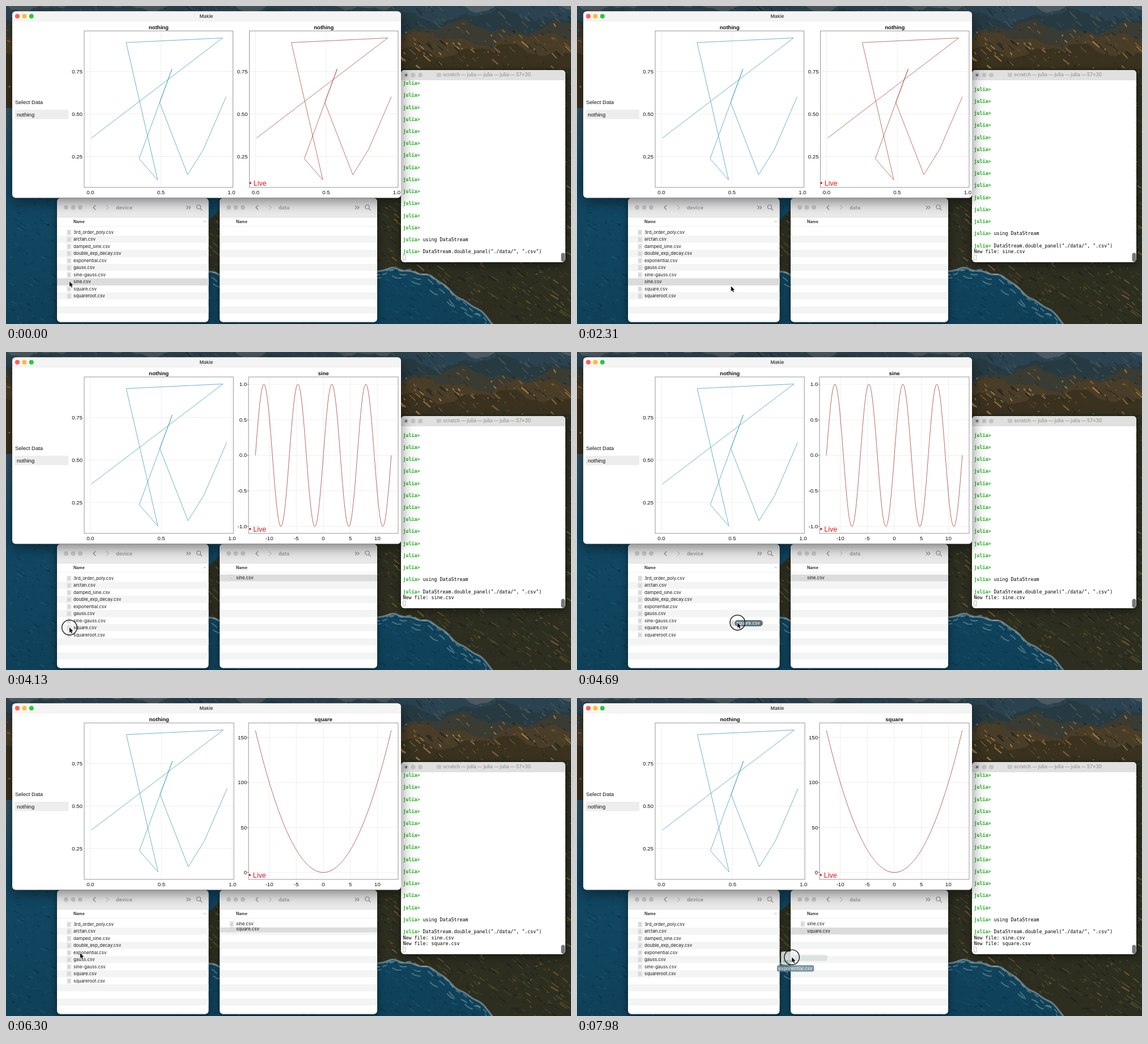
An HTML page with a canvas for the animation above (8 s loop, 997 by 561 pixels).

```html
<!DOCTYPE html>
<html lang="en">
<head>
<meta charset="utf-8">
<title>Live data panels</title>
<style>
html, body { margin: 0; width: 100%; height: 100%; overflow: hidden; background: #16323c; }
canvas { display: block; width: 997px; height: 561px; }
</style>
</head>
<body>
<canvas id="stage" width="997" height="561"></canvas>
<script>
const W = 997, H = 561, LOOP = 8000, STEP = 70, ROW = 12.47;
const HELV = '"Liberation Sans", Arial, sans-serif';
const UI = 'Inter, "Open Sans", sans-serif';
const MONO = '"DejaVu Sans Mono", monospace';
let ctx = document.getElementById('stage').getContext('2d');

const FILES = ['3rd_order_poly', 'arctan', 'damped_sine', 'double_exp_decay', 'exponential',
  'gauss', 'sine-gauss', 'sine', 'square', 'squareroot'].map(name => name + '.csv');

// Each file is dragged from its row to a drop point; everything else follows from these times.
const DRAGS = [
  { file: 'sine.csv', leave: 700, drop: 1820, x: 428, y: 490 },
  { file: 'square.csv', leave: 4200, drop: 5110, x: 430, y: 470 },
  { file: 'exponential.csv', leave: 7140, drop: 8140, x: 430, y: 459 }
];
// Delays after a drop
const LOGGED = 140, PLOTTED = 700, LISTED = 1000, REMOVED = 1400;
const RETURN = 1720, SLIDE = 280;

const clamp = v => Math.max(0, Math.min(1, v));
const lerp = (a, b, p) => a + (b - a) * p;
const easeOut = p => 1 - (1 - p) ** 3;
const done = (t, delay) => DRAGS.filter(d => t >= d.drop + delay);
const range = (n, fn) => Array.from({ length: n }, (_, i) => fn(i));

const removal = (file, t) => {
  const drag = DRAGS.find(d => d.file === file);
  return drag ? clamp((t - drag.drop - REMOVED) / SLIDE) : 0;
};
const rowY = (file, t) => FILES.slice(0, FILES.indexOf(file))
  .reduce((y, above) => y + ROW * (1 - removal(above, t)), 399.3);

function pointerAt(t) {
  const i = DRAGS.findIndex(d => t < d.drop + LOGGED + RETURN);
  const back = easeOut(clamp((t - DRAGS[i].drop - LOGGED) / RETURN));
  const target = DRAGS[i + (back > 0)];
  const startX = 112, startY = rowY(target.file, t) - 0.5;
  if (back > 0) return [lerp(DRAGS[i].x, startX, back), lerp(DRAGS[i].y, startY, back)];
  const p = clamp((t - target.leave) / (target.drop - target.leave));
  return [lerp(startX, target.x, p), lerp(startY, target.y, p)];
}

function text(str, x, y, size, color = '#111', family = UI, weight = 400, align = 'left') {
  ctx.font = `${weight} ${size}px ${family}`;
  ctx.fillStyle = color;
  ctx.textAlign = align;
  ctx.textBaseline = 'middle';
  ctx.fillText(str, x, y);
}
function rect(x, y, w, h, color) {
  ctx.fillStyle = color;
  ctx.fillRect(x, y, w, h);
}
function trace(points, close) {
  ctx.beginPath();
  points.forEach(([x, y]) => ctx.lineTo(x, y));
  if (close) ctx.closePath();
}
function polyline(points, color, width = 1) {
  trace(points);
  ctx.strokeStyle = color;
  ctx.lineWidth = width;
  ctx.stroke();
}
function chevron(x, y, size, color) {
  polyline([[x, y - Math.abs(size)], [x + size, y], [x, y + Math.abs(size)]], color, 1.2);
}
function ring(x, y, r, color, width) {
  ctx.beginPath();
  ctx.arc(x, y, r, 0, 7);
  ctx.strokeStyle = color;
  ctx.lineWidth = width;
  ctx.stroke();
}
function disc(x, y, r, color) {
  ctx.beginPath();
  ctx.arc(x, y, r, 0, 7);
  ctx.fillStyle = color;
  ctx.fill();
}
function pill(x, y, w, h, r, color) {
  ctx.beginPath();
  ctx.roundRect(x, y, w, h, r);
  ctx.fillStyle = color;
  ctx.fill();
}
// Draws a window with a shadow; its content is clipped to the rounded frame.
function panel(x, y, w, h, blur, content) {
  ctx.save();
  ctx.shadowColor = 'rgba(0,0,0,.5)';
  ctx.shadowBlur = blur;
  ctx.shadowOffsetY = blur / 4;
  pill(x, y, w, h, 6, '#fff');
  ctx.shadowColor = 'transparent';
  ctx.clip();
  content();
  ctx.restore();
}

let seed = 11;
const random = () => (seed = seed * 16807 % 2147483647) / 2147483647;
const pick = list => list[Math.floor(random() * list.length)];
const jag = (x, phase) => 9 * Math.sin(x / 31 + phase) + 5 * Math.sin(x / 13 + phase * 3) + 2 * Math.sin(x / 5);

function strokes(count, x, y, w, h, colors, length, slope) {
  for (let i = 0; i < count; i++) {
    const px = x + random() * w, py = y + random() * h, dx = (random() - 0.3) * length;
    polyline([[px, py], [px + dx, py + dx * slope + random() * 3]], pick(colors), 0.6 + random() * 2);
  }
}
function fillClipped(points, color, details) {
  ctx.save();
  trace(points, true);
  ctx.fillStyle = color;
  ctx.fill();
  ctx.clip();
  details();
  ctx.restore();
}

function paintLandscape() {
  const sea = ctx.createLinearGradient(0, 100, 0, H);
  sea.addColorStop(0, '#4a5a60');
  sea.addColorStop(0.45, '#124864');
  sea.addColorStop(1, '#0f4058');
  rect(0, 0, W, H, sea);
  strokes(3000, 0, 260, W, 300, ['#0c354b88', '#1b5d7588', '#10506c88', '#0a2f4488'], 16, 0.4);

  // Hills, from the blue distance to the golden front
  ['#2b4350', '#273a42', '#3a3b32', '#4a3d28', '#3a321f'].forEach((color, i) => {
    const ridge = range(101, k => [k * 10, i * 20 - 2 + jag(k * 10, i * 2)]);
    fillClipped([...ridge, [W, 180], [0, 180]], color, () => {
      const tones = i < 2 ? ['#3a5058', '#1e3039', '#46524f'] : ['#7d6038', '#2a2c24', '#a07a42', '#1f2824', '#574727'];
      strokes(700, 0, i * 20 - 10, W, 100, tones, 18, 0.8);
    });
    if (i === 2) {
      ctx.filter = 'blur(4px)';
      [745, 975].forEach(x => range(3, k => pill(x - 38 + k * 9, 68 + k * 5, 70 - k * 9, 8, 4, '#c3c8cacc')));
      ctx.filter = 'none';
    }
  });

  // Cliffs running down to the shore
  const shore = range(160, k => {
    const x = 350 + k * 4;
    return [x, 470 + Math.max(0, x - 700) ** 2 / 270 + jag(x, 1) * 0.6];
  });
  fillClipped([[350, 385], [640, 110], [W, 110], [W, H], ...shore.reverse()], '#2d2e20', () => {
    strokes(2600, 350, 110, 650, 451, ['#51482c', '#1e2620', '#6b5732', '#37391f', '#3d4426', '#222219'], 20, 0.6);
  });
  polyline(shore, '#8ba3a8aa', 3);
  range(3, k => {
    ctx.setLineDash([9 + k * 4, 6 + k * 7]);
    polyline(shore.map(([x, y]) => [x - k * 4, y + 3 + k * 6 + jag(x, k) * 0.4]), '#a9c0c466', 2);
  });
  ctx.setLineDash([]);
}

const landscape = document.createElement('canvas');
landscape.width = W;
landscape.height = H;
const screen = ctx;
ctx = landscape.getContext('2d');
paintLandscape();
ctx = screen;

function fileIcon(x, y) {
  rect(x - 3, y - 4.2, 6.5, 8.6, '#b9b9b9');
  rect(x - 2.4, y - 3.7, 5.3, 7.6, '#f3f3f3');
  range(3, i => rect(x - 1.5, y - 2 + i * 1.8, 3.5, 0.8, '#aaa'));
}
function fileRow(file, x, y) {
  fileIcon(x, y);
  text(file, x + 8, y + 0.3, 7.9, '#1a1a1a');
}

function finder(x, w, title, drawRows) {
  panel(x, 339, w, 218.5, 12, () => {
    const right = x + w, y = 355.5;
    rect(x, 339, w, 34, '#ebebeb');
    range(3, i => disc(x + 16 + i * 12.5, y, 4, '#c8c8c8'));
    chevron(x + 68, y, -4, '#8b8b8b');
    chevron(x + 87, y, 4, '#c6c6c6');
    text(title, x + 104, y + 0.5, 9, '#999', UI, 600);
    range(2, i => chevron(right - 39 + i * 4, y, 3, '#8e8e8e'));
    ring(right - 17.5, y - 1, 3.5, '#8e8e8e', 1.2);
    polyline([[right - 15, y + 1.5], [right - 11.5, y + 5]], '#8e8e8e', 1.2);
    rect(x, 372.5, w, 0.6, '#d5d5d5');
    text('Name', x + 29, 380.5, 7, '#222', UI, 600);
    rect(x, 388, w, 0.6, '#e6e6e6');
    range(7, i => rect(x, 392.8 + (2 * i + 1) * ROW, w, ROW, '#f3f4f4'));
    drawRows();
  });
}

function drawDevice(t) {
  finder(90, 267.5, 'device', () => {
    polyline([[348, 381.5], [350.5, 379], [353, 381.5]], '#aaa');
    if (!done(t, REMOVED).length) rect(90, 480.5, 268, ROW, '#dcdcdc');
    for (const file of FILES) {
      ctx.globalAlpha = 1 - removal(file, t);
      fileRow(file, 111, rowY(file, t));
    }
    ctx.globalAlpha = 1;
  });
}

function drawData(t) {
  finder(377, 278, 'data', () => {
    const listed = done(t, LISTED);
    listed.forEach((drag, i) => {
      // A later row slides out from behind the one above it.
      const hidden = i ? 1 - clamp((t - drag.drop - LISTED) / SLIDE) : 0;
      const y = 398.6 + ROW * (i - hidden);
      ctx.save();
      ctx.beginPath();
      ctx.rect(377, 392.3 + ROW * i, 278, ROW);
      ctx.clip();
      if (i === listed.length - 1) rect(377, y - 6.2, 278, ROW, '#dcdcdc');
      fileRow(drag.file, 398, y);
      ctx.restore();
    });
  });
}

function drawTerminal(t) {
  const lines = done(t, LOGGED).map(d => 'New file: ' + d.file).reverse();
  lines.push('julia> DataStream.double_panel("./data/", ".csv")', '', 'julia> using DataStream', '');
  while (lines.length < 29) lines.push('julia>', '');
  panel(697, 113, 290, 339, 14, () => {
    lines.forEach((line, i) => {
      const y = 434 - i * 10.61, prompt = line.startsWith('julia>');
      if (prompt) {
        text('julia>', 700.5, y, 8.3, '#22b01f', MONO, 700);
        text(']', 988, y, 8, '#ccc', MONO, 400, 'right');
      }
      text(prompt ? line.slice(7) : line, prompt ? 735.5 : 700.5, y, 8.3, '#000', MONO);
    });
    ctx.strokeStyle = '#aaa';
    ctx.lineWidth = 0.8;
    ctx.strokeRect(700.6, 439, 4.2, 9);
    rect(697, 113, 290, 18, '#e1e0e0');
    range(3, i => disc(706 + i * 12.5, 121.8, 4, '#c3c2c2'));
    disc(706, 121.8, 1.7, '#555');
    pill(760, 118, 8, 7, 1, '#c4c6c8');
    text('scratch — julia — julia — julia — 57×30', 771, 122, 8.3, '#a09e9e', UI, 600);
    pill(979.5, 435.5, 7, 15.5, 3.5, '#777');
  });
}

function axis(x0, x1, title, xTicks, yTicks, points, color, marks) {
  const top = 44, bottom = 320;
  for (const [label, x] of xTicks) {
    rect(x - 0.5, top, 1, bottom - top, '#efefef');
    text(label, x, 329, 9.6, '#111', HELV, 400, 'center');
  }
  for (const [label, y] of yTicks) {
    rect(x0, y - 0.5, x1 - x0, 1, '#efefef');
    if (marks) rect(x0 - 2.5, y - 0.5, 2.5, 1, '#777');
    text(label, x0 - 3, y + 0.5, 9.6, '#111', HELV, 400, 'right');
  }
  polyline(points, color, 0.8);
  ctx.strokeStyle = '#8c8c8c';
  ctx.lineWidth = 0.9;
  ctx.strokeRect(x0, top, x1 - x0, bottom - top);
  text(title, (x0 + x1) / 2, 38, 9.6, '#111', HELV, 700, 'center');
}

// Data points in the unit square
const WALK = [[0.006, 0.358], [0.936, 0.947], [0.253, 0.92], [0.476, 0.112], [0.345, 0.237],
  [0.578, 0.765], [0.49, 0.568], [0.689, 0.143], [0.801, 0.292], [0.962, 0.602]];

function walkAxis(x0, width, color) {
  const toX = v => x0 + 11 + (width - 13.5) * v, toY = v => 340.5 - 300 * v;
  axis(x0, x0 + width, 'nothing',
    [0, 0.5, 1].map(v => [v.toFixed(1), toX(v)]),
    [0.25, 0.5, 0.75].map(v => [v.toFixed(2), toY(v)]),
    WALK.map(([x, y]) => [toX(x), toY(y)]), color);
}

function functionAxis(title, fn, yTicks, toY) {
  const toX = v => 560 + 9.54 * v;
  const points = range(241, i => {
    const v = (i / 120 - 1) * 4 * Math.PI;
    return [toX(v), toY(fn(v))];
  });
  axis(428, 692, title, range(5, i => [String(i * 5 - 10), toX(i * 5 - 10)]),
    yTicks.map(label => [label, toY(+label)]), points, '#a5463d', true);
}

function drawPlots(t) {
  const plotted = done(t, PLOTTED).length;
  panel(11, 9.5, 686, 329, 24, () => {
    rect(11, 9, 686, 18.5, '#f5f4f4');
    ['#fe5f57', '#febc2e', '#28c840'].forEach((c, i) => disc(20 + i * 12.4, 18, 4, c));
    text('Makie', 353.5, 18.3, 8.2, '#444', UI, 600, 'center');
    text('Select Data', 16, 170.5, 9.5, '#111', HELV);
    rect(15.5, 183, 94.5, 16.5, '#ededed');
    text('nothing', 19, 192, 9.5, '#111', HELV);
    walkAxis(138, 262.5 + plotted * 0.8, '#45a0bf');
    if (plotted === 0) walkAxis(429.5, 262.5, '#ad544b');
    if (plotted === 1) functionAxis('sine', Math.sin, range(5, i => (i / 2 - 1).toFixed(1)), v => 182.3 - 125.3 * v);
    if (plotted === 2) functionAxis('square', v => v * v, range(4, i => String(i * 50)), v => 307.7 - 1.587 * v);
    text('• Live', 429 - plotted / 2, 314, 12.5, '#e0141c', HELV);
  });
}

function drawPreview(file, x, y) {
  const swap = clamp((x - 369) / 12); // the row turns into an icon over the other window
  ctx.font = `500 7.9px ${UI}`;
  const width = ctx.measureText(file).width;
  ctx.globalAlpha = 1 - swap;
  fileIcon(x - 9, y + 1);
  pill(x - 5, y - 4.5, width + 8, 11, 5, '#60757f');
  text(file, x - 2, y + 1.3, 7.9, '#fff', UI, 500);
  ctx.globalAlpha = swap;
  pill(x - 19, y - 10, 24, 23, 3, '#e9eeee');
  range(3, i => rect(x - 15 + i * 5.5, y + 5, 3.5, 4, '#7fb5a5'));
  pill(x + 3.5 - width / 2, y + 14, width + 6, 11.5, 3, '#668791');
  text(file, x + 6.5, y + 20.2, 7.9, '#fff', UI, 500, 'center');
  ctx.globalAlpha = 1;
}

function drawPointer(t) {
  const [x, y] = pointerAt(t);
  const drag = DRAGS.find(d => t >= d.leave - 140 && t < d.drop);
  if (drag && t > drag.leave) drawPreview(drag.file, x, y);
  if (drag) ring(x, y, 13.3, '#111', 1.3);
  const arrow = [[0, 0], [0, 9], [2.1, 7.2], [3.7, 10.5], [5.2, 9.8], [3.7, 6.7], [6.5, 6.5]];
  trace(arrow.map(([dx, dy]) => [x + dx, y + dy]), true);
  ctx.strokeStyle = '#fff';
  ctx.lineWidth = 1.2;
  ctx.stroke();
  ctx.fillStyle = '#111';
  ctx.fill();
}

function draw(now) {
  const t = Math.floor((now % LOOP) / STEP) * STEP;
  ctx.drawImage(landscape, 0, 0);
  drawDevice(t);
  drawData(t);
  drawTerminal(t);
  drawPlots(t);
  drawPointer(t);
  requestAnimationFrame(draw);
}
requestAnimationFrame(draw);
</script>
</body>
</html>
```
